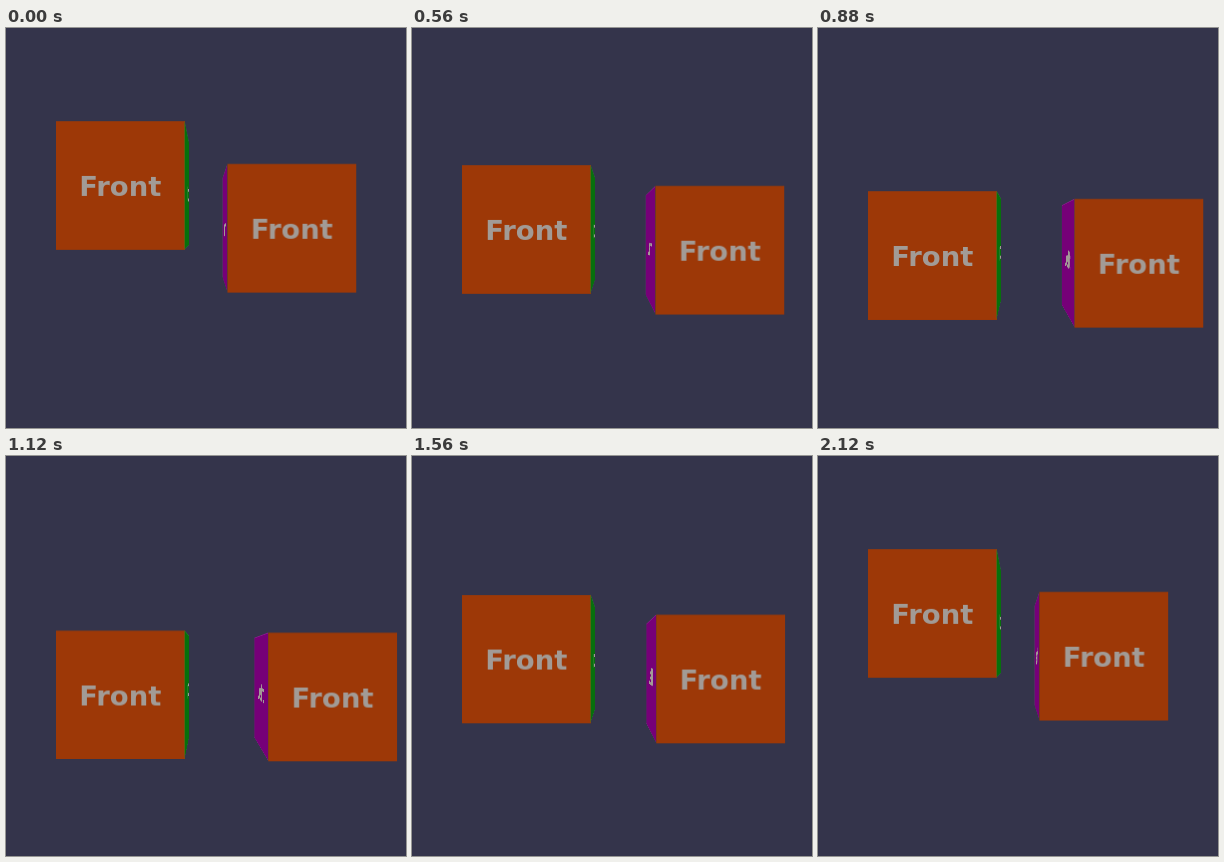
An HTML page that plays this animation: 400x400 px, repeating every 2160 ms.

```html
<!DOCTYPE html>
<html lang="en">
<head>
<meta charset="utf-8">
<title>Sliding cubes</title>
<style>
html, body { margin: 0; width: 100%; height: 100%; overflow: hidden; background: #34344b; }
.stage { position: relative; width: 400px; height: 400px; overflow: hidden; perspective: 450px; }
.cube, .face { position: absolute; width: 150px; height: 150px; }
.cube { transform-style: preserve-3d; }
#a { left: 25px; top: 75px; }
#b { left: 225px; top: 125px; }
.face {
  font: bold 32px/153px "DejaVu Sans", Verdana, sans-serif;
  text-align: center;
  color: #a29b96;
  backface-visibility: hidden;
}
.front { background: #9d3807; box-shadow: inset 0 1px #80391a; transform: translateZ(75px); }
.right { background: #07700c; box-shadow: inset 0 0 0 1px #168a1e; transform: rotateY(90deg) translateZ(75px); }
.left { background: #760078; box-shadow: inset 0 0 0 1px #8d1a90; transform: rotateY(-90deg) translateZ(75px); }
</style>
</head>
<body>
<div class="stage">
  <div class="cube" id="a"><div class="face right">Right</div><div class="face front">Front</div></div>
  <div class="cube" id="b"><div class="face left">Left</div><div class="face front">Front</div></div>
</div>
<script>
const LOOP = 2160;
// [time in ms, distance in px], linear in between
const path = [[0, 0], [320, 26.8], [560, 51.3], [880, 81.7], [1071, 100], [2120, 0], [LOOP, 0]];
const [a, b] = ["a", "b"].map(id => document.getElementById(id));

function distance(t) {
  const i = path.findIndex(p => p[0] > t);
  const [t0, d0] = path[i - 1], [t1, d1] = path[i];
  return d0 + (d1 - d0) * (t - t0) / (t1 - t0);
}

function place(cube, x, y) {
  cube.style.transform = `translate3d(${x}px, ${y}px, -150px)`;
}

function draw() {
  const d = distance(performance.now() % LOOP);
  place(a, 0, d);
  place(b, d / 2, d / 2);
  requestAnimationFrame(draw);
}
draw();
</script>
</body>
</html>
```
